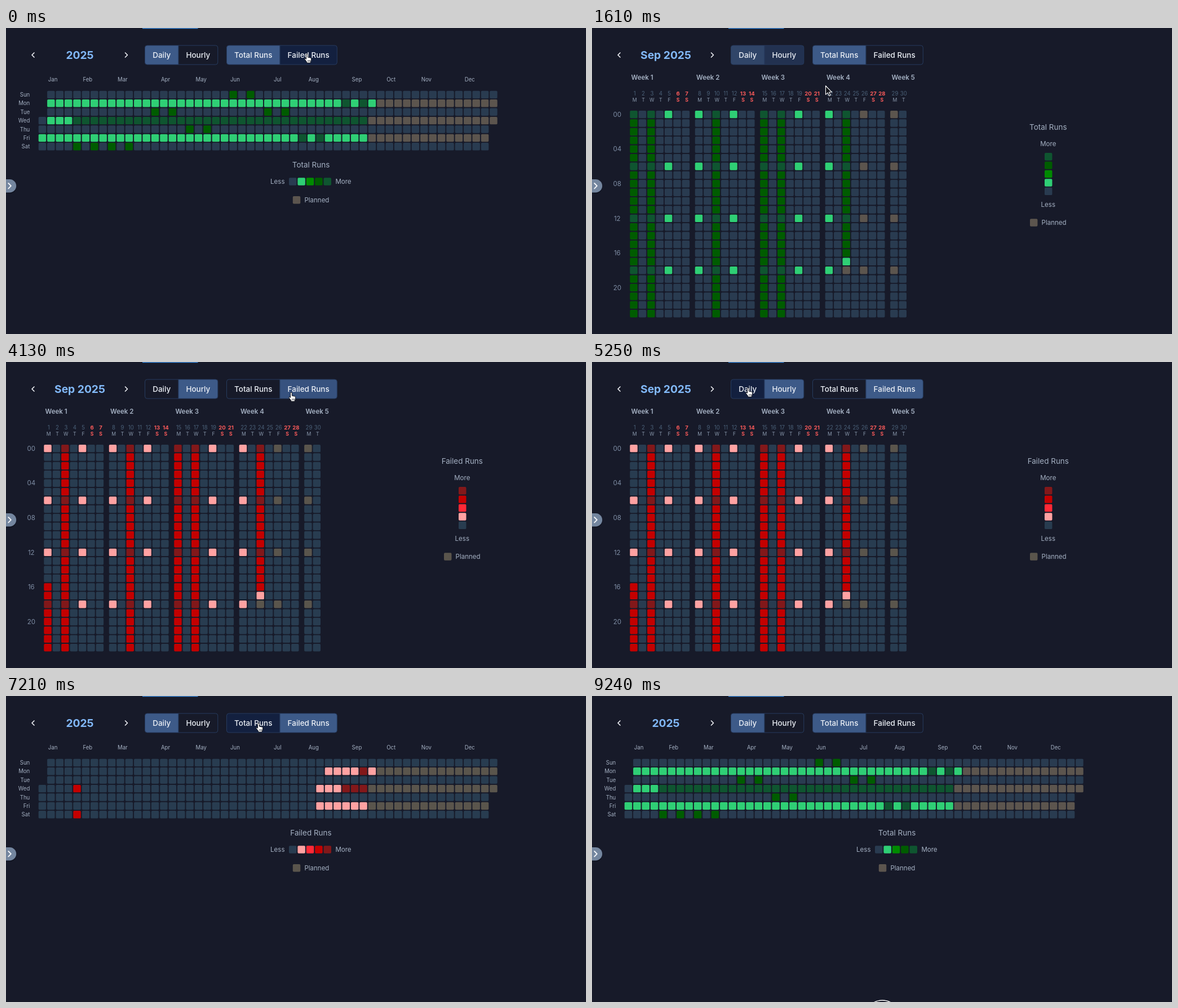
These frames come from a looping animation (1029x544 px, 9310 ms). An HTML page:

```html
<!DOCTYPE html>
<html lang="en">
<head>
<meta charset="utf-8">
<title>Runs calendar</title>
<style>
  html, body { margin: 0; width: 100%; height: 100%; overflow: hidden; background: #171a29; }
  svg { display: block; width: 100%; height: 100%; }
  text { font-family: Inter, sans-serif; fill: #a5b1c3; }
  .small { font-size: 9.62px; }
  .letter { font-size: 8.66px; fill: #8a99ad; }
  .date { font-size: 9.62px; fill: #4a6078; }
  .weekend { font-weight: 700; fill: #f95a5a; }
  .label { font-size: 11.54px; }
  .week { font-size: 11.54px; font-weight: 600; }
  .hour { font-size: 11.54px; fill: #7f8ea5; }
  .head { font-size: 13.47px; }
  .title { font-size: 19.24px; font-weight: 700; fill: #82b9fa; }
  .button { font-size: 13.47px; font-weight: 500; fill: #edf1f7; }
</style>
</head>
<body>
<svg id="stage" viewBox="0 0 1029 544"></svg>
<script>
const LOOP = 9310, STEP = 70, CELL = 13.47, PITCH = 15.395;
const stage = document.getElementById('stage');

function add(parent, tag, attrs, content) {
  const el = document.createElementNS('http://www.w3.org/2000/svg', tag);
  for (const k in attrs) el.setAttribute(k, attrs[k]);
  if (content !== undefined) el.textContent = content;
  parent.append(el);
  return el;
}
const text = (g, s, x, y, cls, anchor = 'start') =>
  add(g, 'text', { x, y, class: cls, 'text-anchor': anchor }, s);
const cell = (g, x, y, fill) =>
  add(g, 'rect', { x, y, width: CELL, height: CELL, rx: 1.9, fill });
const line = (g, d, width) =>
  add(g, 'path', { d, fill: 'none', stroke: '#f4f6fa', 'stroke-width': width,
    'stroke-linecap': 'round', 'stroke-linejoin': 'round' });

// Levels: none, low to high, planned
const MODES = {
  total: { name: 'Total Runs', colors: ['#293b50', '#2fcf75', '#008a00', '#005c00', '#0f5530', '#5c554e'] },
  failed: { name: 'Failed Runs', colors: ['#283c50', '#ffa2a2', '#ff2936', '#c40000', '#82181a', '#5a554c'] }
};
const PLANNED = 5;
const DAYS = ['Sun', 'Mon', 'Tue', 'Wed', 'Thu', 'Fri', 'Sat'];
const MONTHS = ['Jan', 'Feb', 'Mar', 'Apr', 'May', 'Jun', 'Jul', 'Aug', 'Sep', 'Oct', 'Nov', 'Dec'];
const MONTH_COLS = [1, 5, 9, 14, 18, 22, 27, 31, 36, 40, 44, 49];
const SPOTS = { 0: [22, 24], 2: [13, 15, 26, 28], 4: [17, 19], 6: [4, 6, 8, 10] };

function dailyLevel(mode, row, col) {
  const runs = [1, 3, 5].includes(row);
  if (runs && col >= (row === 1 ? 39 : 38)) return PLANNED;
  if (mode === 'total') {
    if (!runs) return SPOTS[row].includes(col) ? 3 : 0;
    if (row === 1) return col === 35 || col === 37 ? 4 : 1;
    if (row === 3) return col === 0 ? 0 : col < 4 ? 1 : 4;
    return col === 30 || col === 32 ? 4 : 1;
  }
  if (col === 4) return row === 3 || row === 6 ? 3 : 0;
  if (row === 1 && col >= 33) return col === 37 ? 4 : 1;
  if (row === 3 && col >= 32) return col >= 35 ? 4 : 1;
  return row === 5 && col >= 32 ? 1 : 0;
}

function hourlyLevel(mode, day, hour) {
  const sixth = hour % 6 === 0;
  if (day === 24 && hour >= 17) return hour === 17 ? 1 : hour === 18 ? PLANNED : 0;
  if (day === 1 && mode === 'failed' && hour < 16) return sixth ? 1 : 0;
  if ([1, 3, 10, 15, 17, 24].includes(day)) return sixth ? 4 : 3;
  if (!sixth) return 0;
  if ([5, 8, 12, 19, 22].includes(day)) return 1;
  return day === 26 || day === 29 ? PLANNED : 0;
}

function buildDaily(mode) {
  const g = add(stage, 'g', {}), { name, colors } = MODES[mode];
  text(g, '2025', 131, 55, 'title', 'middle');
  MONTHS.forEach((m, i) => text(g, m, 59.4 + MONTH_COLS[i] * PITCH, 95.2, 'small'));
  DAYS.forEach((d, row) => {
    const y = 111.7 + row * PITCH;
    text(g, d, 42.3, y + 10.4, 'small', 'end');
    for (let col = row < 3 ? 1 : 0; col <= (row < 4 ? 52 : 51); col++)
      cell(g, 57.7 + col * PITCH, y, colors[dailyLevel(mode, row, col)]);
  });
  text(g, name, 541, 248, 'head', 'middle');
  text(g, 'Less', 494.5, 277, 'label', 'end');
  for (let i = 0; i < 5; i++) cell(g, 502 + i * PITCH, 266.2, colors[i]);
  text(g, 'More', 584.4, 277, 'label');
  cell(g, 508.8, 299, colors[PLANNED]);
  text(g, 'Planned', 529.4, 309.5, 'label');
  return g;
}

function buildHourly(mode) {
  const g = add(stage, 'g', {}), { name, colors } = MODES[mode];
  text(g, 'Sep 2025', 131, 55, 'title', 'middle');
  for (let w = 0; w < 5; w++) text(g, 'Week ' + (w + 1), 69.5 + w * 115.47, 92.2, 'week');
  for (let h = 0; h < 24; h += 4)
    text(g, String(h).padStart(2, '0'), 44.8, 157.8 + h * PITCH, 'hour', 'middle');
  for (let d = 0; d < 30; d++) {
    const x = 67.3 + d * PITCH + Math.floor(d / 7) * 7.7;
    const cls = d % 7 > 4 ? ' weekend' : '';
    text(g, d + 1, x + 8.3, 120.3, 'date' + cls, 'middle');
    text(g, 'MTWTFSS'[d % 7], x + 8.3, 130.8, 'letter' + cls, 'middle');
    for (let h = 0; h < 24; h++)
      cell(g, x, 146.9 + h * PITCH, colors[hourlyLevel(mode, d + 1, h)]);
  }
  text(g, name, 809.3, 180.8, 'head', 'middle');
  text(g, 'More', 809.3, 209.8, 'label', 'middle');
  for (let i = 0; i < 5; i++) cell(g, 803, 222 + i * PITCH, colors[4 - i]);
  text(g, 'Less', 809.3, 317.6, 'label', 'middle');
  cell(g, 777, 339.2, colors[PLANNED]);
  text(g, 'Planned', 797.6, 350, 'label');
  return g;
}

// Fixed parts
add(stage, 'rect', { width: 1029, height: 544, fill: '#171a29' });
add(stage, 'rect', { x: 242, width: 98.5, height: 1.2, fill: '#3f93ea' });
line(stage, 'M50 44l-4 4 4 4', 1.6);
line(stage, 'M211.500 44l4 4-4 4', 1.6);
const pill = 'M0 269H6.500a11.700 11.700 0 0 1 0 23.400H0Z';
add(stage, 'path', { d: pill, fill: '#0c0f1a', opacity: .6, transform: 'translate(0 2)' });
add(stage, 'path', { d: pill, fill: '#74869f' });
line(stage, 'M4.300 276l4.600 4.700-4.600 4.700', 1.9);

const views = {
  dailytotal: buildDaily('total'), hourlytotal: buildHourly('total'),
  dailyfailed: buildDaily('failed'), hourlyfailed: buildHourly('failed')
};

// Buttons
const roundedLeft = (x, r) => `M${r} 31H${x + 4}a4 4 0 0 0-4 4V61a4 4 0 0 0 4 4H${r}Z`;
const roundedRight = (x, r) => `M${x} 31H${r - 4}a4 4 0 0 1 4 4V61a4 4 0 0 1-4 4H${x}Z`;
const buttons = [
  { key: 'daily', name: 'Daily', x: 246.5, r: 306, shape: roundedLeft },
  { key: 'hourly', name: 'Hourly', x: 306, r: 375.8, shape: roundedRight },
  { key: 'total', name: 'Total Runs', x: 391.5, r: 486, shape: roundedLeft },
  { key: 'failed', name: 'Failed Runs', x: 486, r: 587.3, shape: roundedRight }
];
for (const b of buttons) {
  b.el = add(stage, 'path', { d: b.shape(b.x, b.r), stroke: '#263b5e', 'stroke-width': 1 });
  text(stage, b.name, (b.x + b.r) / 2, 52.9, 'button', 'middle');
}

// Pointer
const ring = add(stage, 'circle', { r: 31, fill: 'none', stroke: '#fff', 'stroke-width': 1.4 });
const arrow = add(stage, 'path', {
  d: 'M0 0V15.500L3.700 12.300 6.100 17.900 8.600 16.800 6.200 11.300H11Z',
  fill: '#10121a', stroke: '#fff', 'stroke-width': 1.1, 'stroke-linejoin': 'round'
});
const hand = add(stage, 'g', {});
add(hand, 'path', {
  d: 'M-1.400 9V1.400a1.400 1.400 0 0 1 2.800 0V6l5 1.100q1.600.500 1.400 2l-.600 3.300q-.300 1-.900 1.800V16H-.300V14.400L-3.900 9.700q-.500-1.500.800-1.700.900 0 1.700 1.400Z',
  fill: '#fff', stroke: '#10121a', 'stroke-width': 1, 'stroke-linejoin': 'round'
});
add(hand, 'path', { d: 'M1.700 11v3M3.600 11v3M5.400 11v3', stroke: '#10121a', 'stroke-width': .7 });

// time, x, y
const PATH = [
  [0, 534, 46], [210, 534, 46], [560, 440, 48], [910, 354, 49], [1260, 354, 49],
  [1330, 355, 49], [1400, 355, 49], [1470, 383, 103], [2030, 509, 102], [2380, 509, 102],
  [2590, 481, 93], [2660, 481, 93], [2730, 485, 91], [3010, 111, 100], [3290, 508, 53],
  [4060, 508, 53], [4130, 506, 54], [4690, 276, 46], [5110, 276, 46], [5180, 277, 46],
  [5740, 277, 46], [6090, 14, 58], [6370, 240, 8], [6650, 447, 48], [7140, 447, 48],
  [7210, 448, 48], [8330, 448, 48], [9030, 515, 560], [LOOP, 515, 572]
];
const STATES = [
  [0, 'daily', 'total'], [1540, 'hourly', 'total'], [3640, 'hourly', 'failed'],
  [5740, 'daily', 'failed'], [8330, 'daily', 'total']
];
// start, end, x, y, opacity
const RINGS = [
  [910, 1050, 355, 49, 1], [1050, 1120, 355, 49, .5],
  [3290, 3430, 508, 53, 1], [9240, LOOP, 515, 572, 1]
];

function pointer(t) {
  const i = Math.max(1, PATH.findIndex(p => p[0] >= t));
  const [t0, x0, y0] = PATH[i - 1], [t1, x1, y1] = PATH[i];
  const k = (t - t0) / (t1 - t0);
  return [x0 + (x1 - x0) * k, y0 + (y1 - y0) * k];
}
const stateAt = t => STATES.findLast(s => t >= s[0]);
const over = (b, [x, y]) => x >= b.x && x <= b.r && y >= 31 && y <= 65;

const ACTIVE = [61, 90, 136], ACTIVE_HOVER = [55, 82, 127], HOVER = [19, 32, 63], IDLE = [23, 26, 41];
function target(b, t) {
  const hover = over(b, pointer(t));
  return stateAt(t).includes(b.key) ? (hover ? ACTIVE_HOVER : ACTIVE) : (hover ? HOVER : IDLE);
}
// Averaging recent targets gives a short colour fade
function buttonColor(b, t) {
  const past = [1, 2, 3].map(n => target(b, Math.max(0, t - n * STEP)));
  return `rgb(${[0, 1, 2].map(c => Math.round((past[0][c] + past[1][c] + past[2][c]) / 3))})`;
}
const show = (el, on) => { el.style.display = on ? '' : 'none'; };

function draw(t) {
  const [, period, mode] = stateAt(t);
  for (const k in views) show(views[k], k === period + mode);
  for (const b of buttons) b.el.setAttribute('fill', buttonColor(b, t));

  const p = pointer(t), onButton = buttons.some(b => over(b, p));
  show(hand, onButton);
  show(arrow, !onButton);
  (onButton ? hand : arrow).setAttribute('transform', `translate(${p})`);

  const r = RINGS.find(r => t >= r[0] && t < r[1]);
  show(ring, r);
  if (r) {
    ring.setAttribute('transform', `translate(${r[2]} ${r[3]})`);
    ring.setAttribute('opacity', r[4]);
  }
}

const start = performance.now();
function tick() {
  const t = (performance.now() - start) % LOOP;
  draw(Math.floor(t / STEP) * STEP);
  requestAnimationFrame(tick);
}
tick();
</script>
</body>
</html>
```
